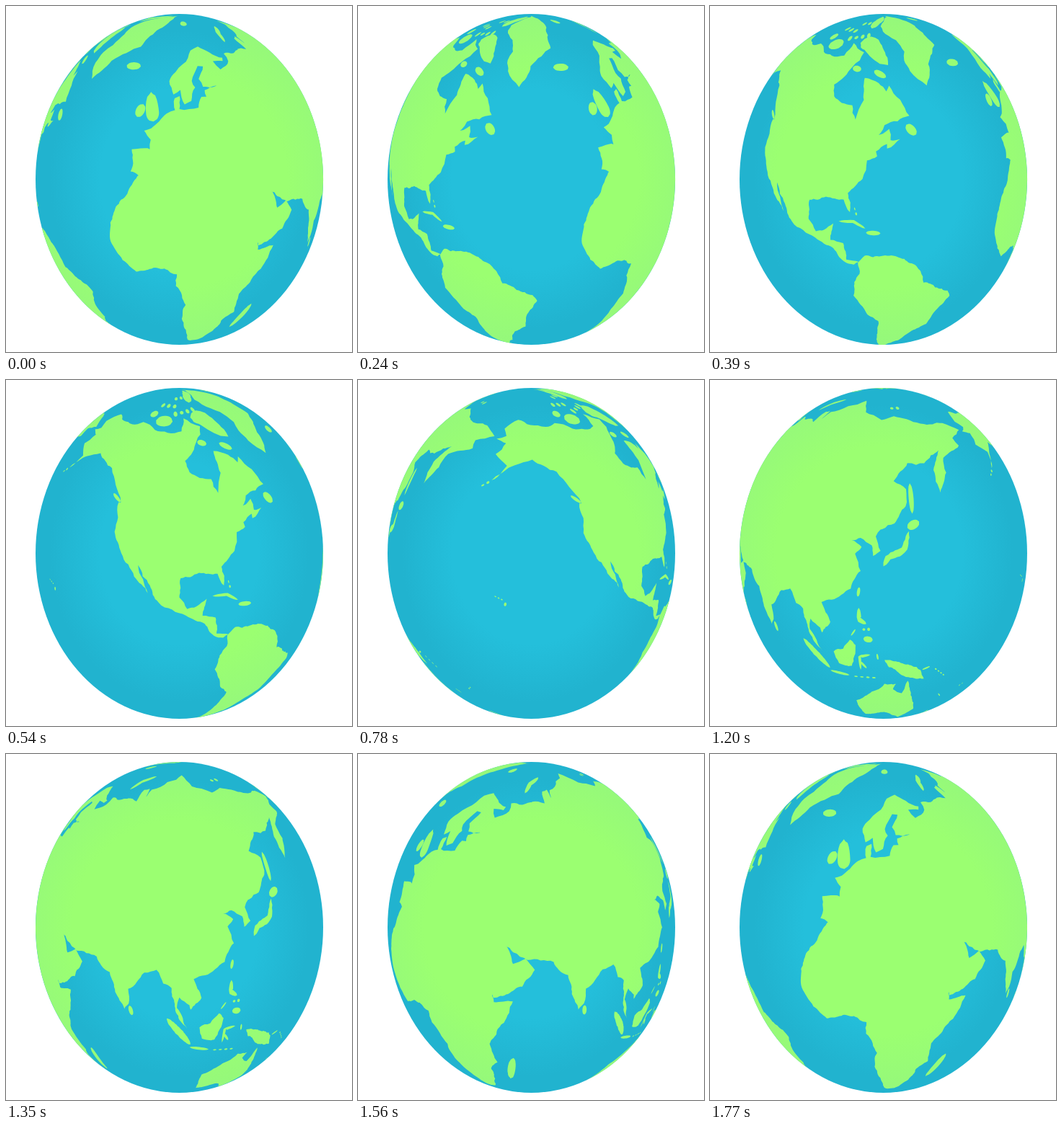
An HTML page that plays this animation: 480x480 px, repeating every 1.8 s.

```html
<!DOCTYPE html>
<html lang="en">
<head>
<meta charset="utf-8">
<title>Rotating globe</title>
<style>
html, body { margin: 0; width: 100%; height: 100%; overflow: hidden; background: #fff; }
svg { display: block; width: 100vw; height: 100vh; }
</style>
</head>
<body>
<svg viewBox="0 0 480 480">
  <defs>
    <radialGradient id="sea">
      <stop offset=".55" stop-color="#24bfdb"/>
      <stop offset=".9" stop-color="#21b3cf"/>
    </radialGradient>
    <radialGradient id="ground" gradientUnits="userSpaceOnUse" cx="240.5" cy="240.5" r="229.5">
      <stop offset=".65" stop-color="#9bff71"/>
      <stop offset="1" stop-color="#95f87b"/>
    </radialGradient>
  </defs>
  <ellipse cx="240.5" cy="240.5" rx="199.5" ry="229.5" fill="url(#sea)"/>
  <path id="land" fill="url(#ground)"/>
</svg>
<script>
const RAD = Math.PI / 180;
const LOOP = 1800, STEP = 30, START_LON = 10.5;
const CX = 240.5, CY = 240.5, RX = 199.5, RY = 229.5;
const DISTANCE = 20, HORIZON = 1 / DISTANCE, LENS = Math.sqrt(DISTANCE ** 2 - 1);
const TILT_SIN = Math.sin(11 * RAD), TILT_COS = Math.cos(11 * RAD);

// Capes and bays as "longitude,latitude"; inland edges overlap their neighbours.
const continents = {
  africa: `-6,35.8 -9.8,30.5 -14.5,26.2 -17,21 -17.4,14.7 -13,8.4 -7.6,4.4 4.4,6.2 9.5,4 9,-.8 13.5,-9.5 11.8,-17 15.2,-27
    18.4,-34.2 20,-34.8 26,-34 32.5,-27.5 35.3,-22 35,-19.8 40.5,-15.2 39,-6 47,3.5 51.2,11.8 43.5,11.2 42,20 45,41 0,40`,
  europe: `-5.5,36 -8.9,37 -9.2,43.1 -1.6,43.4 -1.5,46 -4.7,48.3 -1.7,49 1.6,50.9 4.7,53 8.5,53.9 8.2,57 10.6,57.6 10.5,54.2
    19.5,54.5 21.5,57.3 24,57.3 23.6,59 30,59.9 62,61 62,38 10,36.5`,
  scandinavia: `30,60 23,59.9 21.3,62 25.3,65.3 22,65.5 17.3,61.5 18.8,59.8 16.3,56.3 13,55.4 11,59.2 7.5,58 5,61.5 12.5,66
    19,69.9 25.8,71 41,67.3 40,66.4 33,66.6 36,64.2 40.5,65 44,66.2 44,68.4 60,69 62,58`,
  siberia: `59,69 68,68.5 68,72 72.6,72.5 73,68.5 75,72.3 87,75 104,77.6 113,73.6 129,71.3 140,72.4 160,69.7 180,69 190,66.2
    178,64.6 179,62.4 164,59.9 162.5,56 156.7,51 156,57 163,62 152,59 143,59.3 135.3,54.7 140.8,52.5 140,48 135,43.5 130,42
    122,42 58,45`,
  china: `130,48 129.5,42 127.5,40 129.4,36 126.5,34.5 126,37.5 121.5,39.5 118,38.8 122,37 119.5,35 121.8,30 118,24.5
    110.3,20.6 106,19.5 109.2,13 105,8.8 104.5,10.5 100.5,13.3 99.5,9.5 103.8,1.4 100.5,5 98.7,11 97.5,16.5 94.3,18 91.8,22.4
    88,24 88,48`,
  southAsia: `92,22.5 87,21.3 80.2,15.5 79.9,10.3 77.8,8.2 74.5,14 72.7,20.5 69,22.3 67,24.9 57,25.6 51.5,27.9 48.5,30
    51.5,24.3 56.3,26 59.8,22.5 55,17 43.4,12.7 40,20 35,38 60,50 92,50`,
  canada: `-168,65.6 -162,66.5 -165,68.5 -156.5,71.3 -135,69.2 -127,70.2 -115,68.2 -96,68 -94,71.8 -82,69.3 -87,65 -94.5,60
    -92.5,57 -82.3,55 -80,51.3 -77,56.5 -78,62.3 -70,61 -66,58.8 -64.5,60.3 -55.7,52.3 -67,50 -71,46 -124,46 -123.5,48.5
    -133,57 -145,60.3 -154,58.8 -164.5,54.6 -158,58.6 -165.5,61.5 -161,64.5`,
  america: `-71,47.2 -65,49 -64.5,46 -60.5,46.3 -66,43.8 -66,45 -70.5,43 -70,41.7 -74,40.5 -75.6,35.3 -81.2,31 -80.3,25.3
    -82.8,29 -90,29.5 -97,28 -97.5,22 -94.5,18.2 -91,19 -87,21.4 -88.5,15.8 -83.3,15 -82.5,9.2 -77.3,8.6 -79.5,7.5 -83.5,8.5
    -87.5,13 -95,16 -105.5,20.3 -108.8,25.6 -113.5,31.5 -109.6,23.1 -115,28 -120.6,34.6 -124.3,40.4 -124.5,48.4`,
  southAmerica: `-77.8,8.2 -74.8,11 -62,10.6 -52,4.8 -50,0 -44,-2.6 -37,-4.8 -34.8,-7.5 -39,-13.5 -41,-22 -48.5,-26 -54,-34.5
    -62,-39 -67,-50 -74,-50 -73.5,-38 -70.3,-18.5 -76.2,-14 -81.2,-5.5 -80,.5 -77.4,4`,
  greenland: `-44,59.9 -51.5,64 -53.5,67 -51.5,69.5 -55.5,73 -68,76 -72,78 -60,82 -32,83.5 -12,81.5 -19,76 -22,70.5 -38,65.5`,
  australia: `114,-22.5 115,-34.5 124,-33 131,-31.5 146,-39 153,-30 146,-19 142.5,-10.8 140.5,-17.5 135.5,-15 136.8,-12.2
    131,-12 122.2,-18`,
  newGuinea: `131,-.8 137.5,-1.8 147.8,-6 150.5,-10.3 142.5,-9 138,-7 133,-4`,
  borneo: `109,1.8 113.5,3.3 116.8,7 119,5 116.3,-3.8 110.5,-3`
};

let seed = 7;
function random() {
  seed = (seed * 16807) % 2147483647;
  return seed / 2147483647;
}

const parse = text => text.trim().split(/\s+/).map(p => p.split(",").map(Number));
const mix = (a, b, t) => [a[0] + (b[0] - a[0]) * t, a[1] + (b[1] - a[1]) * t];

// A long island: a spine with a rounded, tapering width in degrees.
function island(width, text) {
  const spine = parse(text), left = [], right = [], n = 10;
  for (let i = 0; i <= n; i++) {
    const t = i / n * (spine.length - 1), k = Math.min(Math.floor(t), spine.length - 2);
    const a = spine[k], b = spine[k + 1], [lon, lat] = mix(a, b, t - k);
    const squeeze = Math.cos(lat * RAD);
    const dx = (b[0] - a[0]) * squeeze, dy = b[1] - a[1];
    const half = width * Math.sqrt(i / n * (1 - i / n)) / Math.hypot(dx, dy);
    left.push([lon - dy * half / squeeze, lat + dx * half]);
    right.unshift([lon + dy * half / squeeze, lat - dx * half]);
  }
  return [...left, ...right];
}

// A row of small islands between two points.
function chain(count, width, text) {
  const [from, to] = parse(text);
  return Array.from({ length: count }, (_, i) =>
    island(width * (0.7 + 0.6 * random()), mix(from, to, i / count) + " " + mix(from, to, (i + 0.6) / count)));
}

const islands = [
  // Atlantic
  island(3.6, "-1,50.8 -1.8,53 -4,58.5"),
  island(2.6, "-8.8,51.8 -6.8,55.2"),
  island(2, "-24,65 -14,65"),
  island(2.4, "-53.5,47.3 -57.5,50"),
  island(1, "-84.8,22.2 -79,22.4 -74.4,20.3"),
  island(1.5, "-74.2,18.9 -68.6,18.8"),
  ...chain(2, 0.5, "-78.6,26.8 -77.5,23.8"),
  // Indian Ocean and Indonesia
  island(4, "49.6,-12.3 45,-25.4"),
  island(1.8, "80.2,9.6 80.8,6"),
  island(2.8, "95.3,5.5 105.5,-5.5"),
  island(1.3, "105.2,-6.8 114.4,-8.2"),
  island(1.2, "125,1.4 120.3,.4 120.2,-5.4"),
  island(1, "120.3,-1.5 123,-4.5"),
  island(0.8, "127.8,1.8 128.2,-.7"),
  ...chain(4, 0.7, "116.6,-8.6 128,-9"),
  // Western Pacific
  island(2, "130.5,31.5 132.5,34.3 138.5,36 140.8,41.3"),
  island(2.4, "140.2,42.2 145.2,43.8"),
  island(1.4, "142.6,46 142.8,54"),
  island(1.1, "121.3,25.1 120.7,22.1"),
  island(1.7, "121,18.5 121,14.5 123.8,13"),
  island(2.3, "122.4,7.6 126.2,7.2"),
  island(0.6, "117.4,8.5 119.4,11"),
  ...chain(2, 1, "122.2,11 126,11.2"),
  island(0.8, "148.5,-5.8 152,-4.6"),
  ...chain(4, 0.5, "154.8,-5.8 162,-10.3"),
  island(0.5, "164,-20.2 167,-22.2"),
  ...chain(2, 0.7, "177.4,-18 180,-16.4"),
  island(2, "173,-34.6 176.5,-37.5 175.3,-41"),
  // Eastern Pacific
  island(0.9, "-155.8,19 -155.3,20.2"),
  ...chain(3, 0.35, "-159.7,22.1 -156,20.8"),
  island(0.9, "-128,50.6 -123.6,48.5"),
  ...chain(2, 0.6, "-169,52.9 -164.5,54.5"),
  // Arctic
  island(1.2, "53,71.5 57,74.5 68,76.8"),
  island(2, "12,79 25,79.3"),
  ...chain(2, 0.8, "138,75 151,75"),
  island(4.4, "-88,72 -78,72 -64.5,65.8"),
  island(1.6, "-73,64.3 -66,62.5"),
  island(1.6, "-86.5,65 -81,64.3"),
  island(3.2, "-117,71 -103,70.8"),
  island(2, "-125,73.3 -118,72.5"),
  island(3, "-84,77 -82,80 -66,82.8"),
  ...chain(4, 1.4, "-103,73 -79,74.8"),
  ...chain(3, 1.3, "-120,76 -98,75.6"),
  ...chain(2, 1.1, "-106,78.5 -88,79.3")
];

// Midpoint displacement turns a straight edge into a coast.
function coast(a, b) {
  const squeeze = Math.cos((a[1] + b[1]) / 2 * RAD);
  const dx = (b[0] - a[0]) * squeeze, dy = b[1] - a[1], length = Math.hypot(dx, dy);
  if (length < 1.4) return [a];
  const push = (random() - 0.5) * 0.2 * Math.min(1, 6 / length);
  const [lon, lat] = mix(a, b, 0.5);
  const middle = [lon - dy * push / squeeze, lat + dx * push];
  return [...coast(a, middle), ...coast(middle, b)];
}

// The globe wears a cropped Miller map stretched from pole to pole.
const mapLat = lat => 1.02 * (1.25 * Math.log(Math.tan(Math.PI / 4 + 0.4 * lat * RAD)) - 26 * RAD);

function makeShape(corners) {
  const pts = corners.flatMap((p, i) => coast(p, corners[(i + 1) % corners.length]));
  const area = pts.reduce((sum, [x, y], i) => {
    const [x2, y2] = pts[(i + 1) % pts.length];
    return sum + x * y2 - y * x2;
  }, 0);
  if (area < 0) pts.reverse();
  return pts.map(([lon, lat]) => {
    const theta = mapLat(lat);
    return { lon: lon * RAD, sin: Math.sin(theta), cos: Math.cos(theta) };
  });
}

const shapes = [...Object.values(continents).map(parse), ...islands].map(makeShape);
const land = document.getElementById("land");

function rotate(p, lon0) {
  const h = p.cos * Math.cos(p.lon - lon0);
  return {
    x: p.cos * Math.sin(p.lon - lon0),
    y: h * TILT_SIN - p.sin * TILT_COS,
    z: p.sin * TILT_SIN + h * TILT_COS
  };
}

const place = (x, y) => `${(CX + RX * x).toFixed(2)} ${(CY + RY * y).toFixed(2)}`;

function limbPoint(a, b) {
  const [x, y] = mix([a.x, a.y], [b.x, b.y], (HORIZON - a.z) / (b.z - a.z));
  const r = Math.hypot(x, y);
  return { x: x / r, y: y / r };
}

// Hidden stretches of a shape are replaced by an arc along the limb.
function outline(shape, lon0) {
  const pts = shape.map(p => rotate(p, lon0));
  const visible = p => p.z > HORIZON;
  const first = pts.findIndex(visible);
  if (first < 0) return "";
  let d = "", exit;
  for (let i = 0; i < pts.length; i++) {
    const a = pts[(first + i) % pts.length], b = pts[(first + i + 1) % pts.length];
    if (visible(a)) {
      const k = LENS / (DISTANCE - a.z);
      d += (d ? "L" : "M") + place(a.x * k, a.y * k);
    }
    if (visible(a) === visible(b)) continue;
    const edge = limbPoint(a, b);
    if (visible(a)) {
      exit = edge;
      d += "L" + place(edge.x, edge.y);
    } else {
      const sweep = exit.x * edge.y - exit.y * edge.x > 0 ? 1 : 0;
      d += `A${RX} ${RY} 0 0 ${sweep} ${place(edge.x, edge.y)}`;
    }
  }
  return d + "Z";
}

function draw(time) {
  const step = Math.floor((time % LOOP) / STEP);
  const lon0 = (START_LON - 360 * step * STEP / LOOP) * RAD;
  land.setAttribute("d", shapes.map(s => outline(s, lon0)).join(""));
}

function tick() {
  draw(performance.now());
  requestAnimationFrame(tick);
}
tick();
</script>
</body>
</html>
```
